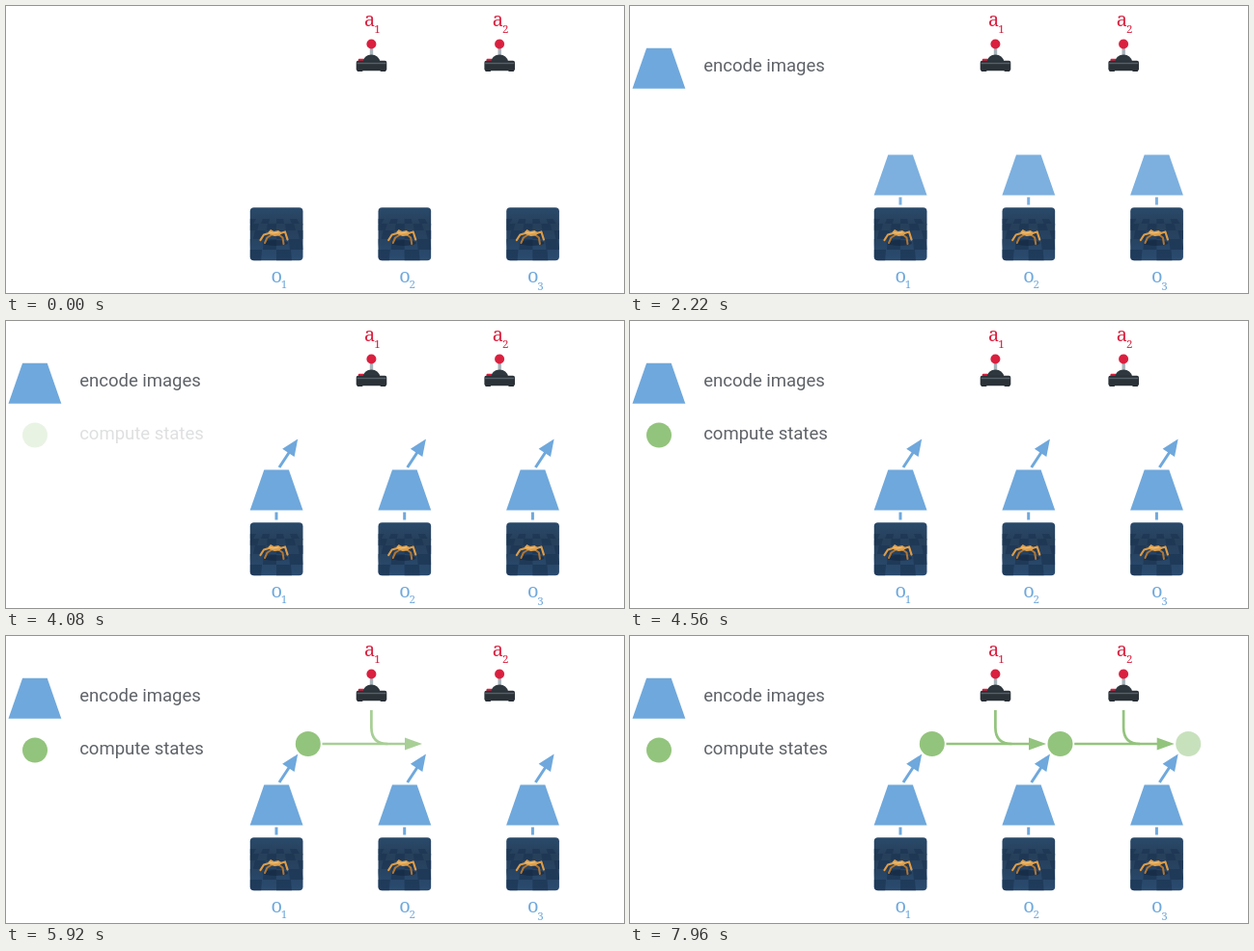
Animation, 640 px wide and 298 px high, one loop 8 s. Source, as an HTML page:

```html
<!DOCTYPE html>
<html lang="en">
<head>
<meta charset="utf-8">
<title>Encode images, compute states</title>
<style>
  html, body { margin: 0; width: 100%; height: 100%; overflow: hidden; background: #fff; }
  svg { display: block; width: 100%; height: 100%; }
  .legend { font: 18.5px Roboto, Inter, sans-serif; fill: #5f6368; }
  .label { font: 20px "Noto Serif", serif; }
  .label.sub { font-size: 11.5px; }
  .blue { fill: #6fa8dc; }
  .green { fill: #93c47d; }
  .red { fill: #d9203f; }
  .line { fill: none; stroke-width: 3; }
  .line.blue { fill: none; stroke: #6fa8dc; }
  .line.green { fill: none; stroke: #93c47d; stroke-width: 2.7; }
  .limb { fill: none; stroke-linecap: round; stroke-linejoin: round; }
</style>
</head>
<body>
<svg id="stage" viewBox="0 0 640 298">
  <defs>
    <linearGradient id="floor" x1="0" y1="0" x2="0" y2="1">
      <stop offset="0" stop-color="#2a4a6b"/>
      <stop offset=".35" stop-color="#263f5a"/>
      <stop offset="1" stop-color="#2a4b70"/>
    </linearGradient>
    <clipPath id="tile"><rect x="252.8" y="209.2" width="54.7" height="55" rx="4"/></clipPath>

    <g id="camera" clip-path="url(#tile)">
      <rect x="252" y="209" width="56" height="56" fill="url(#floor)"/>
      <g id="checks" fill="#1a3350"></g>
      <ellipse cx="279" cy="246" rx="13" ry="3" fill="#14273e" opacity=".6"/>
      <g class="limb" stroke="#b07634" stroke-width="2">
        <path d="M276 237l-5.500 3.500-2.500 5.500"/>
        <path d="M282 237l4.500 3.500 1 6.500"/>
      </g>
      <g class="limb" stroke="#dd9c48" stroke-width="2.200">
        <path d="M274 235.500l-7 2-3.500 5.500"/>
        <path d="M284 236l5-1.500 2.500 8"/>
      </g>
      <path d="M271 235.500l3-3.500 3.500 2 4.500-1 4 2.500-3 3-5 .5-4.500-1.500z" fill="#dfa04c"/>
      <path class="limb" d="M273 235l4 1 5-1" stroke="#f0c27a" stroke-width="1.200"/>
    </g>

    <g id="joystick">
      <rect x="376.800" y="43" width="3.400" height="9" fill="#a9b4bb"/>
      <circle cx="378.400" cy="39.500" r="5" class="red"/>
      <rect x="364.800" y="54.800" width="6" height="4" rx="1" class="red"/>
      <path d="M369.500 58Q371 50.500 378.400 50.500T387.500 58z" fill="#2f383f"/>
      <rect x="363.500" y="64" width="6" height="4" rx="1" fill="#22282e"/>
      <rect x="387.500" y="64" width="6" height="4" rx="1" fill="#22282e"/>
      <rect x="362.700" y="56.800" width="31.600" height="10.400" rx="2" fill="#2b3238"/>
      <rect x="363.500" y="58.800" width="30" height="1.400" fill="#55616a"/>
    </g>

    <path id="encoder" class="blue" d="M267.300 154.500h25.600l14.600 41.900h-54.800z"/>
    <g id="feature">
      <path class="line blue" d="M283 152L293.500 136"/>
      <path class="blue" d="M302.200 122.600L298.600 140.900 286.200 132.800z"/>
    </g>
    <circle id="state" class="green" cx="312.800" cy="112" r="13"/>
    <g id="step">
      <path class="line green" d="M327.500 112H415"/>
      <path class="line green" d="M378.400 77V95Q378.400 112 395.400 112"/>
      <path class="green" d="M431 112L413 105.500V118.500z"/>
    </g>
  </defs>
</svg>
<script>
const LOOP = 8000, TICK = 60, STEPS = 10, PITCH = 132.7;
const stage = document.getElementById('stage');
const fades = [];

const use = (id, col = 0) => `<use href="#${id}" x="${col * PITCH}"/>`;
const row = (id, n) => Array.from({ length: n }, (_, i) => use(id, i)).join('');

function add(markup) {
  const g = document.createElementNS('http://www.w3.org/2000/svg', 'g');
  g.innerHTML = markup;
  stage.append(g);
  return g;
}

function fadeIn(start, markup) {
  fades.push({ start, node: add(markup) });
}

// Subscripts imitate old-style figures: 3 hangs below the baseline.
function label(letter, n, x, y, color) {
  const left = x + (n - 1) * PITCH;
  const drop = n === 3 ? 8.5 : 6.3;
  return `<text class="label ${color}" x="${left}" y="${y}">${letter}</text>` +
    `<text class="label sub ${color}" x="${left + 10.3}" y="${y + drop}">${n}</text>`;
}

// Floor checks grow towards the viewer.
let checks = '';
for (let r = 0, y = 221; r < 5; r++) {
  const h = 5 + r * 2, w = 7 + r * 2;
  for (let c = -4; c < 4; c++) {
    if ((c + r) % 2) continue;
    const x = 280 + c * w;
    checks += `<path d="M${x} ${y}h${w}l${c + 1} ${h}h${-w - 1}z" opacity=".6"/>`;
  }
  y += h;
}
document.getElementById('checks').innerHTML = checks;

add(row('camera', 3) + row('joystick', 2) +
  [1, 2].map(n => label('a', n, 371, 21.3, 'red')).join('') +
  [1, 2, 3].map(n => label('o', n, 274.5, 286.8, 'blue')).join(''));

const stub = i => `<path class="line blue" d="M${280 + i * PITCH} 198.500v8"/>`;

fadeIn(1000, '<use href="#encoder" x="-250.2" y="-110.700"/><text class="legend" x="76.200" y="68.400">encode images</text>');
fadeIn(1740, row('encoder', 3) + [0, 1, 2].map(stub).join(''));
fadeIn(2480, row('feature', 3));
fadeIn(4020, '<use href="#state" x="-282.8" y="6.500"/><text class="legend" x="76.200" y="122.700">compute states</text>');
fadeIn(4760, use('state'));
fadeIn(5500, use('step'));
fadeIn(6240, use('state', 1));
fadeIn(6980, use('step', 1));
fadeIn(7720, use('state', 2));

function draw() {
  const t = performance.now() % LOOP;
  for (const { start, node } of fades) {
    const step = Math.floor((t - start) / TICK) + 1;
    node.setAttribute('opacity', Math.min(Math.max(step / STEPS, 0), 1));
  }
  requestAnimationFrame(draw);
}
draw();
</script>
</body>
</html>
```
